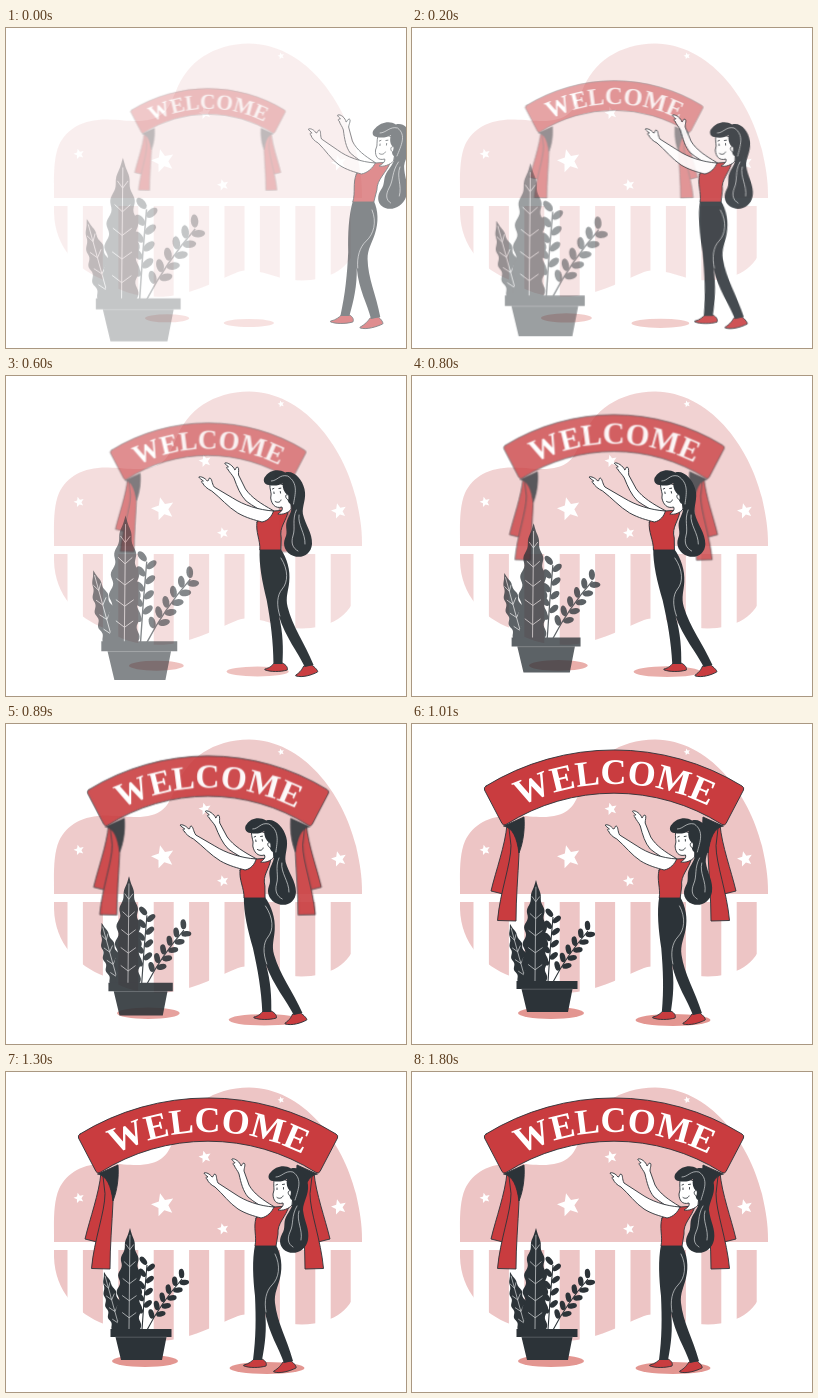
Recreate the animation shown at these times as an HTML page. Size 400 by 320 pixels, loop 2.8 s.

```html
<!DOCTYPE html>
<html lang="en">
<head>
<meta charset="utf-8">
<title>Welcome</title>
<style>
  html, body { margin: 0; width: 100%; height: 100%; overflow: hidden; background: #fff; }
  svg { display: block; width: 400px; height: 320px; }
  text { font: bold 36px "Liberation Serif", "Noto Serif", serif; fill: #fff; }
  .ink { fill: #2c3338; }
  .red { fill: #c93c3f; }
  .line { stroke: #2c3338; stroke-width: .9; stroke-linejoin: round; stroke-linecap: round; }
  .skin { fill: #fff; }
  .pen { fill: none; }
  .vein { fill: none; stroke: #d5d7d8; stroke-width: .7; stroke-linecap: round; }
  .stem { fill: none; stroke: #2c3338; stroke-width: 1.1; }
</style>
</head>
<body>
<svg viewBox="0 0 400 320" xmlns="http://www.w3.org/2000/svg">
  <defs>
    <clipPath id="blob">
      <path d="M48 170 C48 150 47 131 53 117 C61 100 78 91 102 91.500 C121 92 132 95 146 91
        C161 87 164 76 170 63 C181 34 207 16 243 15.500 C297 16 337 69 350 122
        C354 140 356 152 356 168 C357 204 351 232 332 243
        C314 254 292 254 275 250 C258 245 245 240 232 244 C213 251 193 264 165 268
        C139 271 116 266 98 252 C72 242 49 220 48 185 Z"/>
    </clipPath>
    <path id="arc" d="M-8.500 271 A211 211 0 0 1 413.500 271"/>
    <g id="curtain" class="line">
      <path class="red" d="M95 101 C93 122 84 146 79 167 L93 170.500 L106 112 Z"/>
      <path class="red" d="M97 102 C104 108 107 118 107 130 C106 152 104 174 104 197 L85.500 196.500 C88 168 99 140 99 122 Z"/>
      <path class="ink" d="M92 102 L112 93 C113 106 111 119 107 129 C105 114 101 104 92 102 Z"/>
    </g>
  </defs>

  <g id="back">
    <g id="stage" clip-path="url(#blob)" fill="#edc5c5">
      <rect x="40" y="10" width="320" height="160"/>
    </g>
    <g id="stars" fill="#fff"></g>
  </g>

  <g id="shadows" fill="#e39691">
    <ellipse cx="139" cy="289" rx="33" ry="6"/>
    <ellipse cx="261" cy="296" rx="37.500" ry="6"/>
  </g>

  <g id="banner">
    <use href="#curtain"/>
    <use href="#curtain" transform="translate(403 0) scale(-1 1)"/>
    <path class="red line" d="M74 62 A245 245 0 0 1 330 62 Q332.500 63.500 331.500 66 L314 99.500 Q312.500 102 310 100.500
      A202 202 0 0 0 94 100.500 Q91.500 102 90 99.500 L72.500 66 Q71.500 63.500 74 62 Z"/>
    <text text-anchor="middle"><textPath href="#arc" startOffset="50%">WELCOME</textPath></text>
  </g>

  <g id="plant" class="ink">
    <g id="leaves"></g>
    <path d="M104.500 257 H165.500 V265 H104.500 Z M109.500 265 H160.500 L156 288 H115 Z"/>
    <path class="vein" stroke-opacity=".35" d="M109.500 265.200 H160.500"/>
  </g>

  <g id="girl">
    <path class="skin line" d="M267 134 C257 128 248 122 243 113 L238 99 C238 96 240 92 238 91 C236 91 236 94 235 94
      C234 90 229 86 226 87 C225 88 229 90 229 91 C227 91 226 92 228 93 C229 96 232 99 233 102
      C235 111 237 119 242 125 C248 130 256 135 262 138 Z"/>
    <path class="red line" d="M238 293 C243 292 246 289 248 287 L256 287 C260 289 261 292 260 294 C253 296 243 296 238 294 Z"/>
    <path class="red line" d="M268 299 C273 296 275 293 277 290 L285 289 C288 291 291 295 290 296 C284 299 274 302 268 300 Z"/>
    <path class="ink" d="M249 173 H270 C275 182 277 194 274 206 C272 215 268 221 269 231 C271 250 281 267 287 289 L278 291
      C273 276 263 262 259 240 C261 257 259 273 256 288 L247 288 C250 266 250 246 249 224 C247 206 246 188 249 173 Z"/>
    <path class="vein" d="M269 182 C275 194 273 206 266 213 C260 219 258 229 260 240"/>
    <path class="red line" d="M250 146 C255 142 261 137 268 135 L283 134 C280 145 271 151 272 162 L270 174 H249 C251 164 247 156 250 146 Z"/>
    <path class="skin line" d="M268 135 C253 134 239 129 229 122 L212 111 C210 107 211 103 209 102 C207 102 208 105 206 105
      C204 102 200 100 198 101 C198 102 201 104 202 105 C200 105 199 106 201 107 C202 110 205 113 209 115
      C217 122 223 131 232 137 C240 142 248 144 255 146 C261 145 266 140 268 135 Z"/>
    <path class="skin line" d="M269 104 C267 109 268 115 268 118 L267 122 C267 128 270 133 277 131 C278 134 275 136 272 138
      C276 139 283 137 286 133 L288 112 Z"/>
    <path class="ink" d="M267 109 C262 109 261 103 265 100 C269 95 278 92 285 96.500 C294 94 301 103 302 113
      C303 123 297 130 297 138 C298 149 304 157 302 168 C300 178 290 183 282 180 C274 177 272 169 276 162
      C280 156 277 151 280 145 C283 139 288 134 286 128 C284 127 283 124 284 119 C281 116 280 112 281 107
      C277 110 271 110 267 109 Z"/>
    <path class="vein" d="M270 105 C276 105 279 98 287 100 C297 107 292 118 289 128 M291 134 C285 144 288 152 284 160
      C281 167 282 172 287 175 M293 139 C290 149 297 157 295 168"/>
    <path class="line pen" d="M271 116 v1.600 M277.500 115.500 v1.600 M270 113 l1.500 -.6 M276.500 112.500 l2 -.3 M271 125.500 C273 127 276 126.500 277 124"/>
    <path class="line skin" d="M285 119 C281.500 117 281 123 284.500 124"/>
  </g>
</svg>

<script>
const $ = id => document.getElementById(id);
const LOOP = 2800;

function add(parent, tag, attrs) {
  const node = document.createElementNS("http://www.w3.org/2000/svg", tag);
  for (const name in attrs) node.setAttribute(name, attrs[name]);
  return parent.appendChild(node);
}

for (let x = 41.5; x < 340; x += 35.4)
  add($("stage"), "rect", { x, y: 178, width: 20, height: 95 });

function star(x, y, r) {
  const points = [];
  for (let i = 0; i < 10; i++) {
    const a = i * Math.PI / 5 - .25, d = i % 2 ? r * .45 : r;
    points.push([x + d * Math.sin(a), y - d * Math.cos(a)].map(v => v.toFixed(2)));
  }
  add($("stars"), "polygon", { points: points.join(" ") });
}
[[73, 126, 5.5], [157, 133, 12], [217, 157, 6], [275, 28, 3.5], [199, 85, 6.5], [333, 135, 8]]
  .forEach(s => star(...s));

// Wavy leaf from base to tip, with a midrib and paired veins.
function leaf(bx, by, tx, ty, half, waves) {
  const dx = tx - bx, dy = ty - by, len = Math.hypot(dx, dy);
  const width = u => half * (1 - u * u) * (.75 + .5 * u);
  const at = (u, w) => `${(bx + dx * u - dy / len * w).toFixed(2)} ${(by + dy * u + dx / len * w).toFixed(2)}`;
  const left = [], right = [];
  for (let i = 0; i <= 60; i++) {
    const u = i / 60, w = width(u) * (1 + .13 * Math.sin(u * waves * 2 * Math.PI));
    left.push(at(u, w));
    right.unshift(at(u, -w));
  }
  add($("leaves"), "path", { d: "M" + left.concat(right).join("L") + "Z" });
  let veins = `M${at(0, 0)}L${at(.93, 0)}`;
  for (let u = .12; u < .8; u += 1 / waves) {
    const w = width(u) * .6;
    veins += `M${at(u + 5 / len, w)}L${at(u, 0)}L${at(u + 5 / len, -w)}`;
  }
  add($("leaves"), "path", { class: "vein", d: veins });
}

// Curved stem carrying alternating oval leaves.
function sprig(a, c, b, count, from) {
  add($("leaves"), "path", { class: "stem", d: `M${a}Q${c} ${b}` });
  const point = u => a.map((v, i) => (1 - u) ** 2 * v + 2 * u * (1 - u) * c[i] + u * u * b[i]);
  for (let i = 0; i < count; i++) {
    const u = from + (1 - from) * i / (count - 1);
    const [x, y] = point(u), [px, py] = point(u - .02);
    const turn = Math.atan2(y - py, x - px) + (i % 2 ? .8 : -.8);
    add($("leaves"), "ellipse", {
      rx: 4.8, ry: 2.7,
      transform: `translate(${x + 5.6 * Math.cos(turn)} ${y + 5.6 * Math.sin(turn)}) rotate(${turn * 180 / Math.PI})`
    });
  }
}
sprig([136, 258], [138, 225], [141, 193], 9, .25);
sprig([141, 258], [155, 231], [176, 207], 11, .2);
leaf(114, 258, 98, 200, 9, 5);
leaf(123, 258, 124, 156, 14, 6);

// time, fade, girl fade, banner, plant and shadow scale, girl shift at hands and at feet
const keys = [
  [0, .28, .58, .596, 1.39, .67, 105, 87],
  [200, .47, .88, .685, 1.31, .77, 35, 45],
  [600, .58, .98, .754, 1.245, .83, -6, 21],
  [800, .77, 1, .85, 1.13, .89, -22, 14],
  [890, .89, 1, .93, 1.055, .95, -25, 10],
  [1010, 1, 1, 1, 1, 1, -5, 3],
  [1090, 1, 1, 1, 1, 1, 3, -2],
  [1300, 1, 1, 1, 1, 1, 0, 0]
];
const ticks = [0, 100, 200, 400, 600, 800];
for (let t = 810; t <= 1250; t += 40) ticks.push(t);
ticks.push(1300);

function sample(t) {
  const i = keys.findIndex(k => k[0] > t);
  if (i < 0) return keys[keys.length - 1];
  const a = keys[i - 1], b = keys[i], u = (t - a[0]) / (b[0] - a[0]);
  return a.map((v, n) => v + (b[n] - v) * u);
}

function zoom(id, x, y, s) {
  $(id).setAttribute("transform", `translate(${x} ${y}) scale(${s}) translate(${-x} ${-y})`);
}

function draw(time) {
  const t = time % LOOP;
  const [, fade, girlFade, banner, plant, shadow, hands, feet] = sample(ticks.filter(v => v <= t).pop());
  for (const id of ["back", "shadows", "banner", "plant"]) $(id).setAttribute("opacity", fade);
  $("girl").setAttribute("opacity", girlFade);
  zoom("banner", 202, 111, banner);
  zoom("plant", 142, 223, plant);
  zoom("shadows", 206, 293, shadow);
  const skew = (feet - hands) / 197;
  $("girl").setAttribute("transform", `matrix(1 0 ${skew} 1 ${hands - 95 * skew} 0)`);
}

const start = performance.now();
function frame(now) {
  draw(Math.max(0, now - start));
  requestAnimationFrame(frame);
}
draw(0);
requestAnimationFrame(frame);
</script>
</body>
</html>
```
